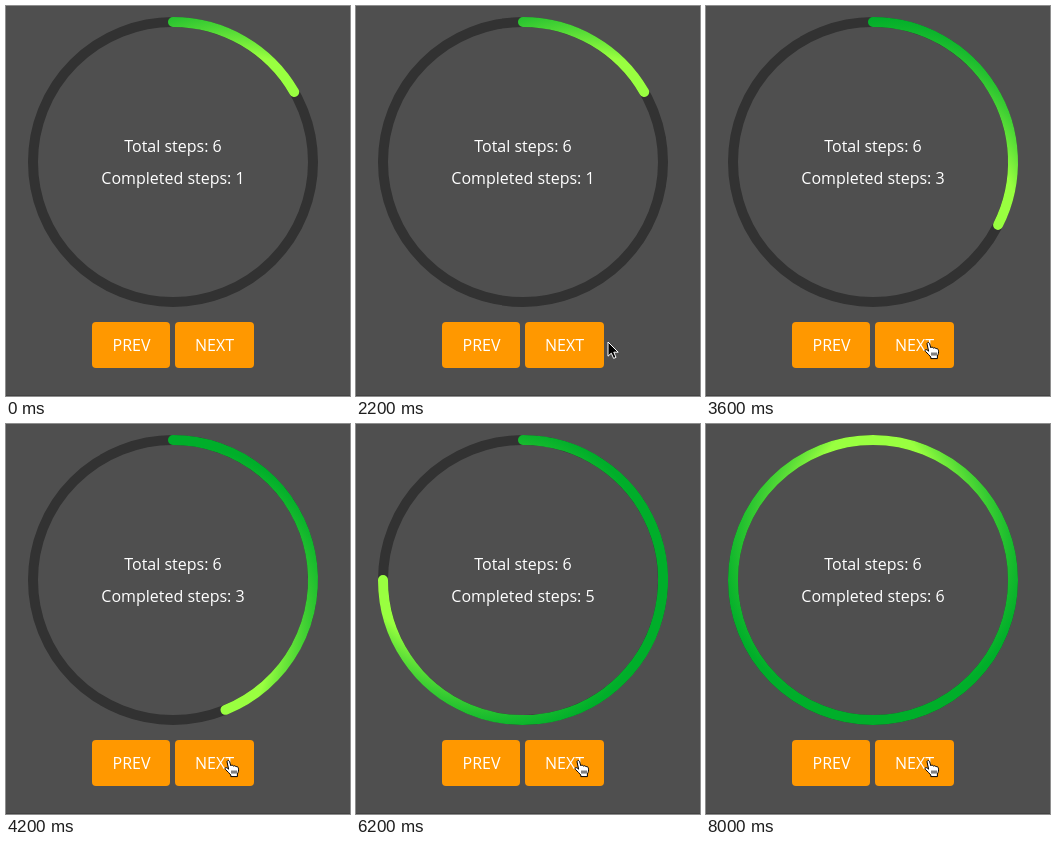
An HTML page for the animation above (8100 ms loop, 344 by 390 pixels).

```html
<!DOCTYPE html>
<html lang="en">
<head>
<meta charset="utf-8">
<title>Radial progress</title>
<style>
html, body { margin: 0; width: 100%; height: 100%; overflow: hidden; background: #4f4f4f; }
svg { display: block; }
text { font: 16px "Open Sans", sans-serif; fill: #fff; text-anchor: middle; }
</style>
</head>
<body>
<svg width="344" height="390" viewBox="0 0 344 390">
  <defs>
    <radialGradient id="glow" gradientUnits="userSpaceOnUse" cx="167" cy="156" r="182">
      <stop offset=".3" stop-color="#99ff40"/>
      <stop offset=".85" stop-color="#00ae2a"/>
    </radialGradient>
  </defs>
  <rect width="344" height="390" fill="#4f4f4f"/>
  <rect y="389" width="344" height="1" fill="#434343"/>
  <circle cx="167" cy="156" r="140" fill="none" stroke="#323232" stroke-width="10"/>
  <path id="arc" fill="none" stroke="url(#glow)" stroke-width="10" stroke-linecap="round"/>
  <text x="167" y="146">Total steps: 6</text>
  <text id="done" x="167" y="178"></text>
  <g fill="#ff9800">
    <rect x="86" y="316" width="78" height="46" rx="4"/>
    <rect x="169" y="316" width="79" height="46" rx="4"/>
  </g>
  <text x="125.5" y="345">PREV</text>
  <text x="208.5" y="345">NEXT</text>
  <path id="arrow" d="M0 0V14.2L3.3 11.2L5.6 16.4L8 15.4L5.8 10.2H10.2Z" fill="#000" stroke="#fff" stroke-width="1"/>
  <path id="hand" d="M3 1.6C3.4.2 5.2.2 5.6 1.6L6.8 5.8C7.2 4.8 9 4.8 9.4 6.2C10 5.4 11.6 5.6 12 6.8C12.8 6.2 14.2 6.8 14.4 8.2C14.8 10.4 14.4 12 13.4 14V16.6H6.8V15C5.4 13 3.4 11.6 1.4 9.4C.4 8 1.8 7 3.2 8L4.6 9.2Z M8 10.5V13.6M10 10.5V13.6M12 10.5V13.6" fill="#fff" stroke="#000" stroke-width="1" stroke-linejoin="round"/>
</svg>
<script>
const $ = id => document.getElementById(id);
const arc = $("arc"), done = $("done"), arrow = $("arrow"), hand = $("hand"), glow = $("glow");
const LOOP = 8100, FRAME = 100, STEP = 60, SWEEP = 1000;
const CX = 167, CY = 156, R = 140;
const clicks = [2667, 3520, 4650, 5700, 6750];

// time, x, y of the pointer
const trail = [
  [600, 296, 356], [800, 295, 349], [1100, 291, 327], [1300, 289, 299],
  [1400, 289, 299], [1600, 289, 308], [1900, 289, 308], [2000, 285, 313],
  [2200, 252, 336], [2300, 230, 341], [2400, 218, 336]
];

// each click retargets the sweep from wherever it currently is
function progress(t) {
  let from = STEP, start = 0, target = STEP, steps = 1;
  const at = time => from + (target - from) * Math.min(1, (time - start) / SWEEP);
  for (const click of clicks) {
    if (click > t) break;
    from = at(click);
    start = click;
    target = ++steps * STEP;
  }
  return { angle: at(t), steps };
}

function pointer(t) {
  const i = trail.findIndex(p => p[0] > t);
  if (i < 0) return trail[trail.length - 1].slice(1);
  const [t0, x0, y0] = trail[i - 1], [t1, x1, y1] = trail[i];
  const k = (t - t0) / (t1 - t0);
  return [x0 + (x1 - x0) * k, y0 + (y1 - y0) * k];
}

function onCircle(deg) {
  const a = deg * Math.PI / 180;
  return [CX + R * Math.sin(a), CY - R * Math.cos(a)];
}

function place(node, visible, x, y) {
  node.style.display = visible ? "" : "none";
  if (visible) node.setAttribute("transform", `translate(${x} ${y})`);
}

function draw(t) {
  const { angle, steps } = progress(t);
  const [fx, fy] = onCircle(angle);
  const [mx, my] = onCircle(angle / 2);
  const seg = (x, y) => `A${R} ${R} 0 0 1 ${x} ${y}`;
  arc.setAttribute("d", `M${CX} ${CY - R}` + seg(mx, my) + seg(fx, fy));
  glow.setAttribute("fx", fx);
  glow.setAttribute("fy", fy);
  done.textContent = "Completed steps: " + steps;

  const shown = t >= trail[0][0];
  const [x, y] = shown ? pointer(t) : [0, 0];
  const over = x < 248;
  place(arrow, shown && !over, x, y);
  place(hand, shown && over, x, y);
}

function tick() {
  const t = performance.now() % LOOP;
  draw(Math.floor(t / FRAME) * FRAME);
  requestAnimationFrame(tick);
}
tick();
</script>
</body>
</html>
```
